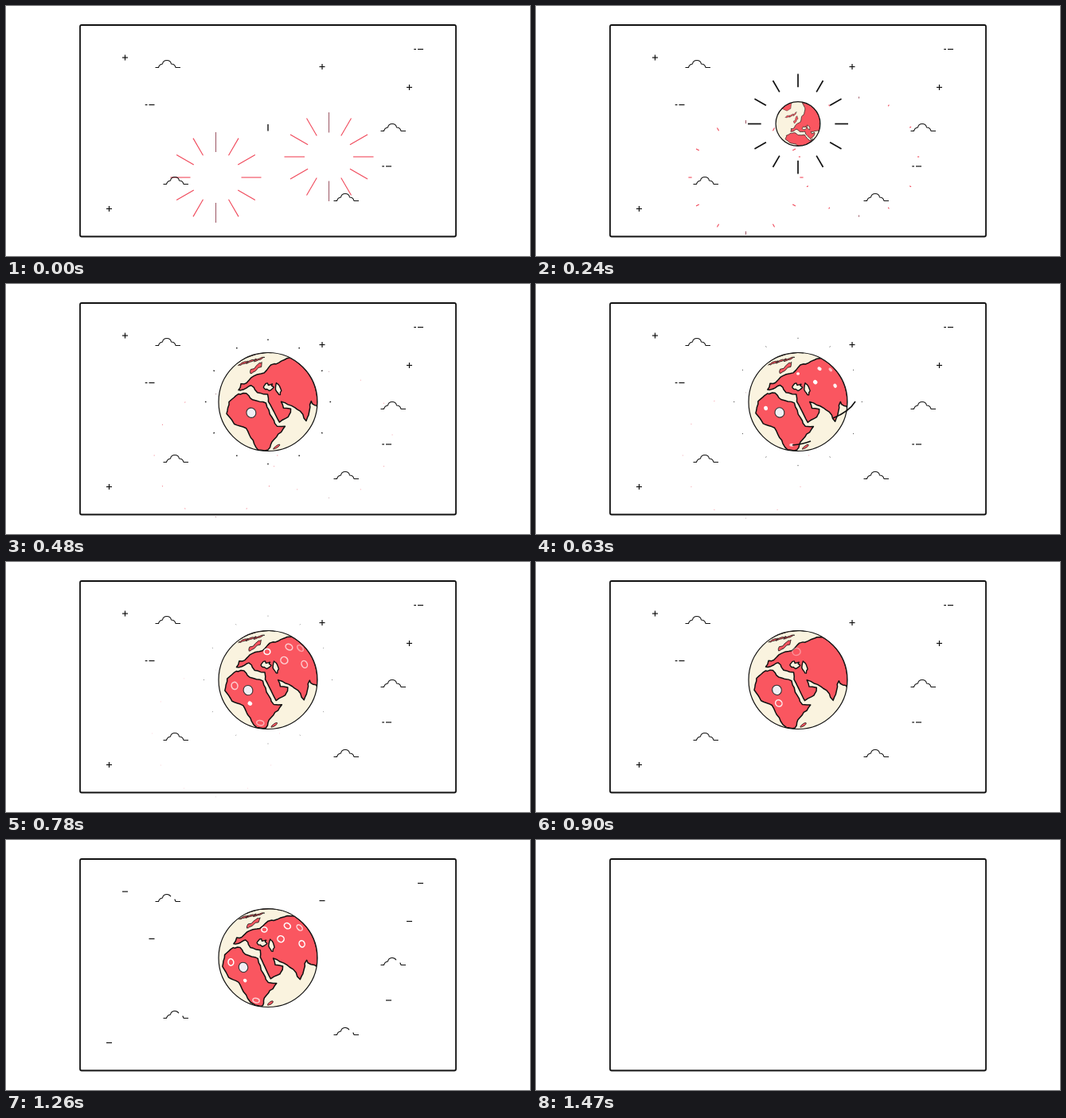
Recreate the animation shown at these times as an HTML page with a canvas. Size 658 px wide and 315 px high, loop 1.57 s.

```html
<!DOCTYPE html>
<html lang="en">
<head>
<meta charset="utf-8">
<title>Globe</title>
<style>
  html, body { margin: 0; overflow: hidden; background: #fff; }
  canvas { display: block; }
</style>
</head>
<body>
<canvas id="stage" width="658" height="315"></canvas>
<script>
const ctx = document.getElementById('stage').getContext('2d');
const LOOP = 1570, INK = '#111', RED = '#fa5660', CREAM = '#faf3df', RAY = '#f0485a';
const CX = 329, CY = 148.5, RADIUS = 62, TILT = 0.42;

const clamp = v => Math.max(0, Math.min(1, v));
const ramp = (t, from, to) => clamp((t - from) / (to - from));
const smooth = v => v * v * (3 - 2 * v);

let seed = 7;
const jitter = size => {
  seed = seed * 16807 % 2147483647;
  return (seed / 2147483647 - 0.5) * size;
};

// Turns a few corners into a ragged closed coastline.
function coast(corners) {
  const points = [];
  corners.forEach(([x, y], i) => {
    const [nx, ny] = corners[(i + 1) % corners.length];
    const pieces = Math.ceil(Math.hypot(nx - x, ny - y) / 5);
    points.push([x, y]);
    for (let k = 1; k < pieces; k++) {
      const f = k / pieces;
      points.push([x + (nx - x) * f + jitter(1.8), y + (ny - y) * f + jitter(1.8)]);
    }
  });
  return points;
}

function blob(x, y, rx, ry, angle, rough) {
  const c = Math.cos(angle), s = Math.sin(angle);
  return Array.from({ length: 14 }, (_, i) => {
    const a = i * Math.PI / 7, u = rx * Math.cos(a), v = ry * Math.sin(a);
    return [x + u * c - v * s + jitter(rough), y + u * s + v * c + jitter(rough)];
  });
}

// The eastern edge runs just behind the rim.
const rim = Array.from({ length: 9 }, (_, i) => {
  const a = -1.13 + i * 0.153;
  return [CX + 64 * Math.cos(a), CY + 64 * Math.sin(a)];
});

// Land and sea at rest; points outside the disc lie on the far side.
const africa = coast([[293, 139], [303, 138], [311, 146], [328, 150], [333, 164], [342, 179],
  [352, 179], [338, 196], [330, 209], [317, 210], [303, 182], [288, 177], [278, 164], [281, 149]]);
const eurasia = coast([[331, 148], [330, 139], [317, 137], [309, 128], [300, 133], [293, 134],
  [296, 126], [303, 125], [309, 118], [325, 112], [333, 102], [343, 99], [350, 95], ...rim,
  [388, 152], [384, 147], [378, 172], [371, 160], [360, 153], [347, 148], [350, 156],
  [359, 157], [356, 167], [345, 174]]);
const islands = [
  blob(306, 80, 27, 11, -0.3, 3),
  blob(315, 106, 10, 2.5, -0.7, 2.5),
  blob(341, 205, 5, 1.3, -0.6, 0.5),
  ...[0, 1, 2].map(i => blob(298 + i * 10, 100 - i * 2.5, 7, 0.8, -0.4, 1))];
const seas = [blob(330, 130, 6.5, 4, 0.1, 3), blob(343, 132, 2.5, 8, -0.3, 2)];
const pulses = [[291.5, 157.5], [353, 123], [377, 127], [357, 106], [370, 107], [324, 203],
  [331, 113], [312, 179]];

const pluses = [[149.5, 65], [397, 76.5], [506.5, 102.5], [129.5, 255.5]];
const dashes = [[520.5, 54.5], [183, 124.5], [480.5, 202]];
const clouds = [[203, 77], [213, 224], [486, 157], [427, 245]];
const cloudShape = new Path2D('M-15.5 .5h4q1-4 5-4.5c1-6 10-6 11 0q4.5 0 5.5 4.5h6');

function pen(color, width) {
  ctx.strokeStyle = color;
  ctx.lineWidth = width;
}

function line(x1, y1, x2, y2) {
  ctx.beginPath();
  ctx.moveTo(x1, y1);
  ctx.lineTo(x2, y2);
  ctx.stroke();
}

// Radius that flies out towards 80 and slows down.
const reach = (t, from, tau, power = 1) => 80 - (80 - from) * Math.exp(-((t / tau) ** power));

function burst(x, y, inner, outer, color, width, upright = color) {
  for (let i = 0; i < 12; i++) {
    const a = i * Math.PI / 6, c = Math.cos(a), s = Math.sin(a);
    const end = Math.max(outer, inner + 0.9);
    pen(i % 6 === 3 ? upright : color, width);
    line(x + c * inner, y + s * inner, x + c * end, y + s * end);
  }
}

function bursts(t) {
  ctx.globalAlpha = 1 - ramp(t, 360, 900);
  burst(263.5, 216, reach(t, 32, 175), reach(t, 57, 225), RAY, 1.1, '#a0606c');
  ctx.globalAlpha = 1 - ramp(t, 360, 620);
  burst(405.5, 190, reach(t, 30.5, 118), reach(t, 56, 140), RAY, 1.1, '#a0606c');
  ctx.globalAlpha = 1;
}

function blackBurst(t) {
  if (t < 60) {
    pen(INK, 1.4);
    line(CX, CY + 0.5, CX, CY + 9);
  } else if (t < 800) {
    burst(CX, CY, reach(t, 0, 258, 2), reach(t, 8, 191, 1.6), INK, 1.7 - ramp(t, 360, 800) * 1.2);
  }
}

const turn = (a, b, angle) => {
  const c = Math.cos(angle), s = Math.sin(angle);
  return [a * c + b * s, b * c - a * s];
};

// Lifts a disc point onto the sphere, turns it and returns its disc position and depth.
function project([px, py], spin, tip) {
  let x = (px - CX) / RADIUS, y = (py - CY) / RADIUS;
  const r = Math.hypot(x, y), back = r > 1;
  if (back) { x *= (2 - r) / r; y *= (2 - r) / r; }
  let z = Math.sqrt(Math.max(0, 1 - x * x - y * y)) * (back ? -1 : 1);
  [y, z] = turn(y, z, -TILT);
  [x, z] = turn(x, z, spin);
  [y, z] = turn(y, z, TILT + tip);
  const d = z < 0 ? Math.hypot(x, y) : 1;
  return [x / d * RADIUS, y / d * RADIUS, z];
}

function globe(t) {
  const grown = smooth(ramp(t, 135, 360));
  const scale = grown * (1 - smooth(ramp(t, 1290, 1450)));
  if (scale <= 0) return;
  const spin = 0.64 * (1 - grown) - 0.00023 * Math.max(0, t - 360);
  const tip = 1 - grown;

  ctx.save();
  ctx.translate(CX, CY);
  ctx.scale(scale, scale);
  ctx.save();
  ctx.beginPath();
  ctx.arc(0, 0, RADIUS, 0, 7);
  ctx.fillStyle = CREAM;
  ctx.fill();
  ctx.clip();

  const shape = (points, fill, width) => {
    ctx.beginPath();
    for (const point of points) ctx.lineTo(...project(point, spin, tip).slice(0, 2));
    ctx.closePath();
    ctx.fillStyle = fill;
    ctx.fill();
    pen(INK, width);
    ctx.stroke();
  };
  for (const land of [africa, eurasia]) shape(land, RED, 1.5);
  for (const land of islands) shape(land, RED, 0.8);
  for (const sea of seas) shape(sea, CREAM, 1.4);

  const spot = (point, r, color, width) => {
    const [x, y, z] = project(point, spin, tip);
    ctx.beginPath();
    ctx.ellipse(x, y, r * Math.sqrt(Math.max(0, z)), r, Math.atan2(y, x), 0, 7);
    ctx.fillStyle = color;
    pen(color, width);
    width ? ctx.stroke() : ctx.fill();
    return z;
  };
  pulses.forEach((point, i) => {
    const start = 560 + Math.max(0, i - 5) * 70;
    if (t < start) return;
    const age = (t - start) % 520;
    const depth = project(point, spin, tip)[2];
    ctx.globalAlpha = clamp(1 - (age - 180) / 140) * clamp(depth * 1.6);
    if (age < 90) spot(point, 2 + age / 90, '#fff', 0);
    else spot(point, 2.4 + age / 100, '#fff', 1.5);
  });
  ctx.globalAlpha = 1;

  const hub = 6.2 * ramp(t, 310, 450);
  if (hub > 0) {
    spot([309.5, 162.5], hub, '#f0eff4', 0);
    spot([309.5, 162.5], hub, '#333', 1.1);
  }
  ctx.restore();

  ctx.beginPath();
  ctx.arc(0, 0, RADIUS, 0, 7);
  pen(INK, 1.2 / Math.max(scale, 0.3));
  ctx.stroke();
  ctx.restore();
}

// A stroke that runs along a curve and leaves it again.
function swoosh(t, curve, length) {
  const head = length * ramp(t, 540, 630), tail = length * ramp(t, 630, 750);
  if (head <= tail) return;
  pen(INK, 1.6);
  ctx.setLineDash([head - tail, 999]);
  ctx.lineDashOffset = -tail;
  ctx.stroke(new Path2D(curve));
  ctx.setLineDash([]);
  ctx.lineDashOffset = 0;
}

function scenery(t) {
  const upright = 3.5 * (1 - ramp(t, 1110, 1240));
  const flat = 3.5 * (1 - ramp(t, 1260, 1440));
  const gap = ramp(t, 1230, 1430);
  pen(INK, 1.2);
  for (const [x, y] of pluses) {
    line(x - flat, y, x + flat, y);
    line(x, y - upright, x, y + upright);
  }
  for (const [x, y] of dashes) {
    line(x - flat, y, x + flat, y);
    line(x - 5.5 - upright * 0.8, y, x - 5.5, y);
  }
  if (gap === 1) return;
  pen(INK, 1.1);
  ctx.setLineDash(gap ? [29 * (1 - gap), 42 * gap, 13 * (1 - gap), 99] : []);
  for (const [x, y] of clouds) {
    ctx.save();
    ctx.translate(x, y);
    ctx.stroke(cloudShape);
    ctx.restore();
  }
  ctx.setLineDash([]);
}

function draw(t) {
  ctx.fillStyle = '#fff';
  ctx.fillRect(0, 0, 658, 315);
  ctx.lineJoin = 'round';
  if (t < 1470) {
    bursts(t);
    scenery(t);
    blackBurst(t);
    globe(t);
    swoosh(t, 'M373 169Q393 161 401 148', 37);
    swoosh(t, 'M322 203Q335 202 345 198', 24);
  }
  pen(INK, 1.8);
  ctx.beginPath();
  ctx.roundRect(93, 24, 472, 266.5, 2);
  ctx.stroke();
}

// Motion is held on 30 ms steps, with a double hold every 180 ms.
function step(t) {
  if (t >= 1470) return 1470;
  const held = Math.floor(t / 30) * 30;
  return held % 180 === 30 ? held - 30 : held;
}

const begin = performance.now();
function frame() {
  draw(step((performance.now() - begin) % LOOP));
  requestAnimationFrame(frame);
}
frame();
</script>
</body>
</html>
```
